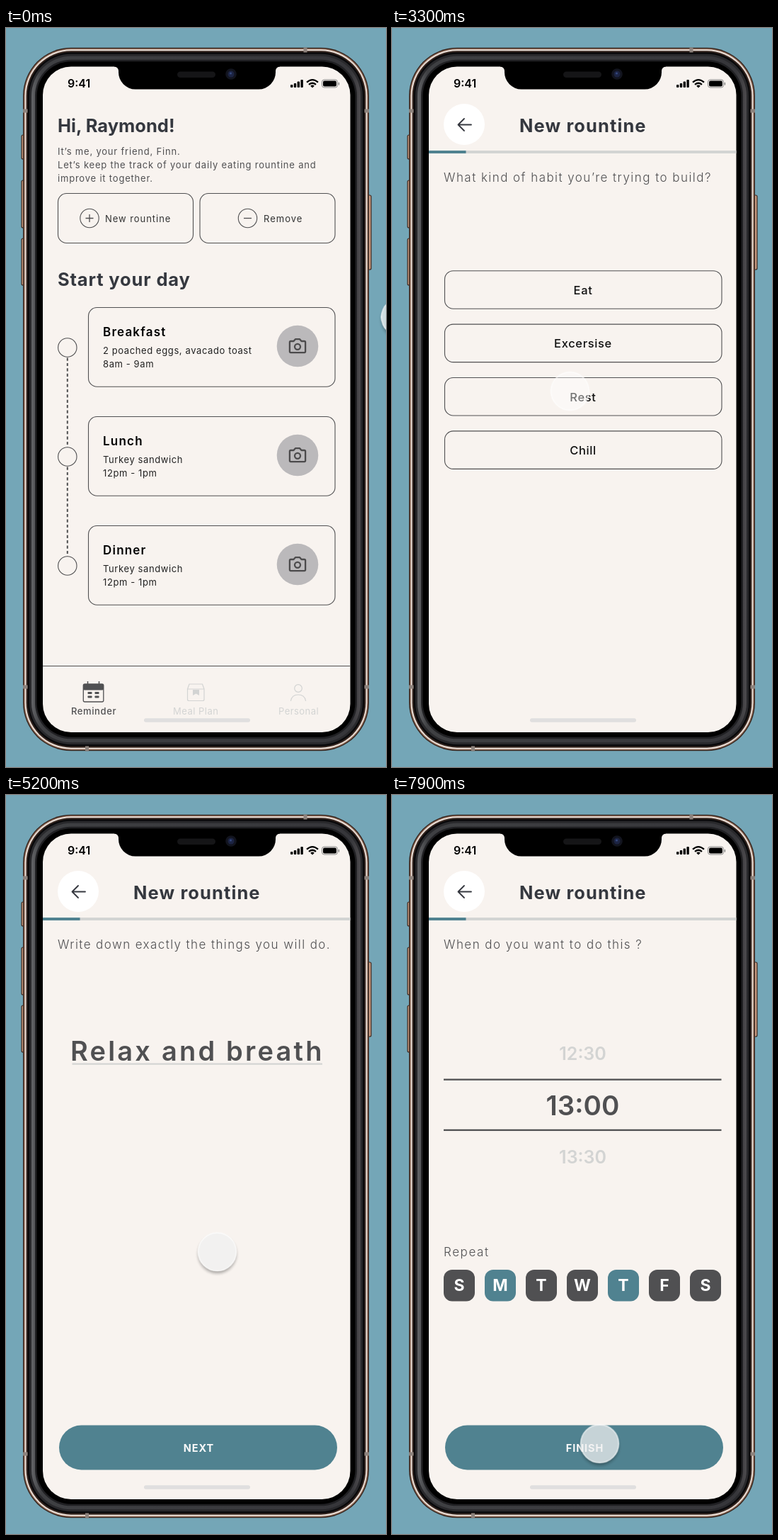
An HTML page that plays this animation: 537 px wide and 1043 px high, repeating every 8000 ms.

```html
<!DOCTYPE html>
<html lang="en">
<head>
<meta charset="utf-8">
<title>Routine planner</title>
<style>
  html, body { margin: 0; width: 100%; height: 100%; overflow: hidden; background: #74a6b7; }
  svg { display: block; width: 100vw; height: 100vh; }
  text { font-family: Inter, "Open Sans", sans-serif; white-space: pre; }
</style>
</head>
<body>
<svg id="stage" viewBox="0 0 537 1043" xmlns="http://www.w3.org/2000/svg"></svg>
<script>
const INK = '#35383f', GREY = '#505052', TEAL = '#508290', CREAM = '#f8f3ef', PALE = '#d3d4d3';
const LOOP = 8000;

const text = (x, y, str, size, { weight = 400, fill = GREY, gap = 0, mid = false } = {}) =>
  `<text x="${x}" y="${y}" font-size="${size}" font-weight="${weight}" fill="${fill}" letter-spacing="${gap}"${mid ? ' text-anchor="middle"' : ''}>${str}</text>`;
const rect = (x, y, w, h, r, fill, extra = '') =>
  `<rect x="${x}" y="${y}" width="${w}" height="${h}" rx="${r}" fill="${fill}" ${extra}/>`;
const box = (x, y, w, h, r = 12) => rect(x, y, w, h, r, 'none', `stroke="${GREY}" stroke-width="1.1"`);
const circle = (x, y, r, fill, extra = '') => `<circle cx="${x}" cy="${y}" r="${r}" fill="${fill}" ${extra}/>`;
const ring = (x, y, r, stroke = GREY, width = 1.1) => circle(x, y, r, 'none', `stroke="${stroke}" stroke-width="${width}"`);
const line = (d, stroke, width, extra = '') =>
  `<path d="${d}" fill="none" stroke="${stroke}" stroke-width="${width}" ${extra}/>`;
const ROUND = 'stroke-linecap="round" stroke-linejoin="round"';

// Nested rounded bodies, concentric with the screen corners.
function phone() {
  const side = (x, y, h) => rect(x, y, 5, h, 2, '#c99a80', 'stroke="#3d281f" stroke-width="1.2"');
  const seam = '#8d827c';
  const shells = [
    [24, '#35241d'], [25.4, '#94705d'], [26.6, '#eaded6'], [28.6, '#33241e'], [30.6, '#08080a'],
    [33, '#29292c'], [36, 'url(#bezel)'], [41, '#202023'], [43.5, '#000'],
  ];
  return side(22, 151, 34) + side(22, 215, 67) + side(22, 297, 66) + side(511, 236, 105) +
    shells.map(([x, fill]) => rect(x, x + 3.7, 537 - 2 * x, 1040.6 - 2 * x, 92 - x, fill)).join('') +
    [117, 930].map(y => rect(24, y - 2.5, 6.5, 5, 0, seam) + rect(506.5, y - 2.5, 6.5, 5, 0, seam)).join('') +
    rect(420.5, 27.5, 5, 7, 0, seam) + rect(112, 1013.5, 5, 7, 0, seam) +
    rect(52, 54.5, 434.5, 939.5, 40, CREAM);
}

function statusBar() {
  const notch = '<path d="M153 53H387V54.5A6 6 0 0 0 381 60.500V62A24 24 0 0 1 357 86.500H183A24 24 0 0 1 159 62V60.500A6 6 0 0 0 153 54.500Z"/>';
  const bars = [4, 6, 8.5, 11].map((h, i) => rect(402 + i * 4.8, 84 - h, 3.4, h, 1, '#000')).join('');
  const wifi = line('M425 76.6Q433 69.6 441 76.6M428 79.9Q433 75.6 438 79.9', '#000', 2.2) +
    '<path d="M430.2 81.8Q433 79.4 435.8 81.8L433 84.6Z"/>';
  const battery = rect(446.5, 73, 22, 11, 3.2, 'none', 'stroke="#888" stroke-width="1"') +
    rect(448, 74.5, 19, 8, 2, '#000') + rect(469.7, 76.7, 1.4, 4, 0.7, '#888');
  return notch + rect(242, 61.5, 54, 8.5, 4.2, '#151517') + circle(318, 65, 7.8, '#12141e') +
    circle(318, 65, 4.5, '#1c2443') + circle(317.5, 64, 1.6, '#34477d') +
    text(87, 84, '9:41', 16, { weight: 600, fill: '#000' }) + bars + wifi + battery;
}

function camera(x, y) {
  return circle(x, y, 29.3, '#bbb9bb') +
    line(`M${x - 9.5} ${y - 7}h4l2.4 -2.8h6.2l2.4 2.8h4q1.6 0 1.6 1.6v13q0 1.6 -1.6 1.6h-19q-1.6 0 -1.6 -1.6v-13q0 -1.6 1.6 -1.6Z`, '#4c4b4c', 2.3, ROUND) +
    ring(x, y + 0.8, 4, '#4c4b4c', 2.3);
}

function tabBar() {
  const calendar = rect(109.3, 926, 28.5, 25, 2, 'none', `stroke="${GREY}" stroke-width="1.3"`) +
    rect(109, 926, 29, 8.5, 2, GREY) + line('M115.5 922v6M131.5 922v6', GREY, 1.5) +
    [937, 942.5].map(y => rect(115.5, y, 6, 3, 0.8, GREY) + rect(125.5, y, 6, 3, 0.8, GREY)).join('');
  const store = line('M256.5 933l2.5 -7h18.5l2.5 7v14.5q0 2 -2 2h-19.5q-2 0 -2 -2ZM256.5 933h23.5', PALE, 1.2, ROUND) +
    `<path d="M264 934h9v8l-4.5 -2.5l-4.5 2.5Z" fill="${PALE}"/>`;
  const person = ring(413, 932, 5.3, PALE, 1.2) + line('M402.5 949.5Q404 941 413 941T423.5 949.5', PALE, 1.2, ROUND);
  return line('M52 900.5H486.5', GREY, 1.2) + calendar + store + person +
    text(92, 968.5, 'Reminder', 13, { weight: 500, gap: 0.6 }) +
    text(236, 968.5, 'Meal Plan', 13, { fill: PALE, gap: 0.5 }) +
    text(385, 968.5, 'Personal', 13, { fill: PALE, gap: 0.45 });
}

function home() {
  const intro = { gap: 0.8 }, detail = { fill: '#222', gap: 0.6 };
  const meals = [
    ['Breakfast', '2 poached eggs, avacado toast', '8am - 9am'],
    ['Lunch', 'Turkey sandwich', '12pm - 1pm'],
    ['Dinner', 'Turkey sandwich', '12pm - 1pm'],
  ].map(([name, food, when], i) => {
    const y = 394.5 + i * 154;
    return box(116.5, y, 348.5, 111.7) + ring(86.8, y + 56.5, 13.2) +
      (i < 2 ? line(`M86.8 ${y + 71}v126`, GREY, 2, 'stroke-dasharray="4.2 3.2"') : '') +
      text(137, y + 40, name, 17, { weight: 600, fill: '#000', gap: 1.2 }) +
      text(137, y + 65, food, 13, detail) + text(137, y + 84, when, 13, detail) + camera(412, y + 54.5);
  }).join('');
  const sign = (x, plus) => ring(x, 268.5, 13.2) +
    line(`M${x - 5.5} 268.5h11` + (plus ? `M${x} 263v11` : ''), GREY, 1.3);
  return text(73, 147, 'Hi, Raymond!', 25.5, { weight: 700, fill: INK }) +
    text(73, 178.5, 'It’s me, your friend, Finn.', 13, intro) +
    text(73, 197.5, 'Let’s keep the track of your daily eating rountine and', 13, intro) +
    text(73, 216.5, 'improve it together.', 13, intro) +
    box(73.5, 233.5, 191, 70) + box(274, 233.5, 191, 70) + sign(118, true) + sign(341.5, false) +
    text(140, 274, 'New rountine', 13, { fill: '#333', gap: 0.95 }) +
    text(364, 274, 'Remove', 13, { fill: '#333', gap: 1 }) +
    text(73, 364, 'Start your day', 25.5, { weight: 700, fill: INK, gap: 0.85 }) + meals + tabBar();
}

const header = () => circle(102, 136, 29, '#fff') +
  line('M112 136.5H94M102 128l-8.5 8.5l8.5 8.5', INK, 1.8, ROUND) +
  text(180, 147, 'New rountine', 25.5, { weight: 700, fill: INK, gap: 1.1 }) +
  rect(52, 173, 434.5, 4, 0, PALE) + rect(52, 173, 52.5, 4, 0, TEAL);
const question = (str, gap) => text(73, 217, str, 17, { weight: 300, gap });
const button = label => rect(75, 889.5, 393, 63, 31.5, TEAL) +
  text(272.5, 927, label, 14.5, { weight: 700, fill: '#fafafa', gap: 0.9, mid: true });

const options = () => question('What kind of habit you’re trying to build?', 1.45) +
  ['Eat', 'Excersise', 'Rest', 'Chill'].map((label, i) => {
    const y = 342.7 + i * 75.4;
    return box(74.5, y, 391.5, 53.5) +
      text(270, y + 33, label, 16.5, { weight: 500, fill: '#111', gap: 0.65, mid: true });
  }).join('');

function keyboard() {
  const key = (x, y, w, label, size, fill = '#fff') => rect(x, y + 1.3, w, 44, 5, '#8d9099') +
    rect(x, y, w, 44, 5, fill) +
    text(x + w / 2, y + 28.5, label, size, { weight: size > 20 ? 300 : 400, fill: '#000', mid: true });
  const row = (letters, x, pitch, w, y) => [...letters].map((c, i) => key(x + i * pitch, y, w, c, 26)).join('');
  const dark = '#a0a6b4', stroke = '#45474c';
  const smile = ring(100, 933, 13.3, stroke, 1.7) + circle(95.5, 929, 1.8, stroke) + circle(104.5, 929, 1.8, stroke) +
    line('M91.5 935h17q-1 7.5 -8.5 7.5t-8.5 -7.5ZM92.5 938h15', stroke, 1.5, ROUND);
  const mic = rect(439.7, 919.5, 8.6, 18, 4.3, 'none', `stroke="${stroke}" stroke-width="1.8"`) +
    line('M434.5 930v2.5q0 9 9.5 9t9.5 -9v-2.5M444 941.5v6M438.5 947.5h11', stroke, 1.8, ROUND);
  return rect(52, 673, 435, 322, 0, '#cacdd5') +
    row('qwertyuiop', 56.5, 43.3, 37.5, 681) + row('asdfghjkl', 76.5, 43.7, 37.5, 737.5) +
    row('zxcvbnm', 117, 44.5, 38.5, 794) +
    key(56.5, 794, 44, '', 16, dark) + key(439.5, 794, 44, '', 16, dark) +
    key(56.5, 851, 95.5, '123', 16, dark) + key(158, 851, 223.5, 'space', 16) + key(388, 851, 95.5, 'return', 16, dark) +
    line('M78.5 807.5l9.5 9.5h-5v7.5h-9v-7.5h-5Z', '#000', 1.5, ROUND) +
    line('M456 808h14q2.5 0 2.5 2.5v11q0 2.5 -2.5 2.5h-14l-7 -8ZM459.5 812.5l7 7M466.5 812.5l-7 7', '#000', 1.5, ROUND) +
    smile + mic + rect(200, 980.5, 141, 5.5, 2.7, '#000');
}

const writePrompt = () => question('Write down exactly the things you will do.', 1.4);
const write = () => rect(89, 375.5, 354, 2, 0, PALE) + keyboard();
const written = () => rect(93.5, 378.5, 353.5, 2.2, 0, PALE) +
  text(91, 375, 'Relax and breath', 38, { weight: 600, gap: 3.2 }) + button('NEXT');

function schedule() {
  const time = (y, str, size, fill) => text(269.5, y, str, size, { weight: 600, fill, mid: true });
  const days = [...'SMTWTFS'].map((day, i) => {
    const x = 73 + i * 58;
    return rect(x, 670, 44, 44.5, 12, i === 1 || i === 4 ? TEAL : GREY) +
      text(x + 22, 700, day, 23, { weight: 700, fill: '#fff', mid: true });
  }).join('');
  return question('When do you want to do this ?', 1.45) +
    time(374, '12:30', 25, PALE) + time(452, '13:00', 38.5, GREY) + time(520, '13:30', 25, PALE) +
    rect(73, 400.5, 392.5, 2.3, 0, GREY) + rect(73, 471.8, 392.5, 2.3, 0, GREY) +
    text(73, 650.5, 'Repeat', 17, { weight: 300, gap: 1.6 }) + days + button('FINISH');
}

const layer = (id, content) => `<g id="${id}">${content}</g>`;
document.getElementById('stage').innerHTML = `
  <defs>
    <linearGradient id="bezel"><stop stop-color="#626366"/><stop offset=".03" stop-color="#3f4043"/>
      <stop offset=".97" stop-color="#36363a"/><stop offset="1" stop-color="#4c4a4d"/></linearGradient>
    <clipPath id="screen"><rect x="52" y="54.5" width="434.5" height="939.5" rx="40"/></clipPath>
    <filter id="blur" x="-30%" y="-30%" width="160%" height="160%"><feGaussianBlur stdDeviation="2.2"/></filter>
    <mask id="outside"><rect x="-45" y="-45" width="90" height="90" fill="#fff"/><circle r="27"/></mask>
  </defs>
  <rect width="537" height="1043" fill="#74a6b7"/>${phone()}
  <g clip-path="url(#screen)">${rect(195, 974.3, 150, 5.4, 2.7, '#e0dfdf')}
    ${layer('home', home())}${layer('header', header())}${layer('options', options())}${layer('prompt', writePrompt())}
    ${layer('write', write())}${layer('written', written())}${layer('schedule', schedule())}
  </g>${statusBar()}
  <g id="cursor">
    <g id="shadow" mask="url(#outside)"><circle cy="3.5" r="27" fill="#000" opacity=".32" filter="url(#blur)"/></g>
    <circle id="disc" r="27"/>
    <circle r="26.8" fill="none" stroke="#fff" stroke-width="1.5" opacity=".75"/>
  </g>`;

// Each step is [time in ms, properties, easing towards the next step].
const play = (id, steps) => document.getElementById(id).animate(
  steps.map(([ms, props, easing = 'linear']) => ({ offset: ms / LOOP, easing, ...props })),
  { duration: LOOP, iterations: Infinity });

const FADE = 200;
function show(id, from, to) {
  const steps = [[0, { opacity: from ? 0 : 1 }]];
  if (from) steps.push([from, { opacity: 0 }], [from + FADE, { opacity: 1 }]);
  if (to) steps.push([to, { opacity: 1 }], [to + FADE, { opacity: 0 }]);
  play(id, [...steps, [LOOP, { opacity: to ? 0 : 1 }]]);
}
show('home', 0, 1050);
show('header', 1050);
show('options', 1050, 3400);
show('prompt', 3400, 6700);
show('write', 3400, 4500);
show('written', 4500, 6700);
show('schedule', 6700);

const at = (x, y) => ({ transform: `translate(${x}px, ${y}px)` });
play('cursor', [
  [0, at(557.5, 408), 'ease-in-out'], [800, at(171.5, 264)], [1900, at(171.5, 264), 'ease-in-out'],
  [2800, at(251.5, 512.5)], [4600, at(251.5, 512.5), 'ease-in'], [5200, at(298.5, 644), 'ease-out'],
  [5900, at(293.5, 911)], [7100, at(293.5, 911), 'ease-in-out'], [7600, at(293.5, 915.5)], [LOOP, at(293.5, 915.5)],
]);

function press(id, up, down) {
  const taps = [950, 3300, 6600].flatMap(ms =>
    [[ms - 150, up], [ms - 50, down], [ms + 50, down], [ms + 150, up]]);
  play(id, [[0, up], ...taps, [LOOP, up]]);
}
press('disc', { fill: '#f0f1f1', opacity: 0.74 }, { fill: '#fff', opacity: 0.42 });
press('shadow', { opacity: 1 }, { opacity: 0 });
</script>
</body>
</html>
```
